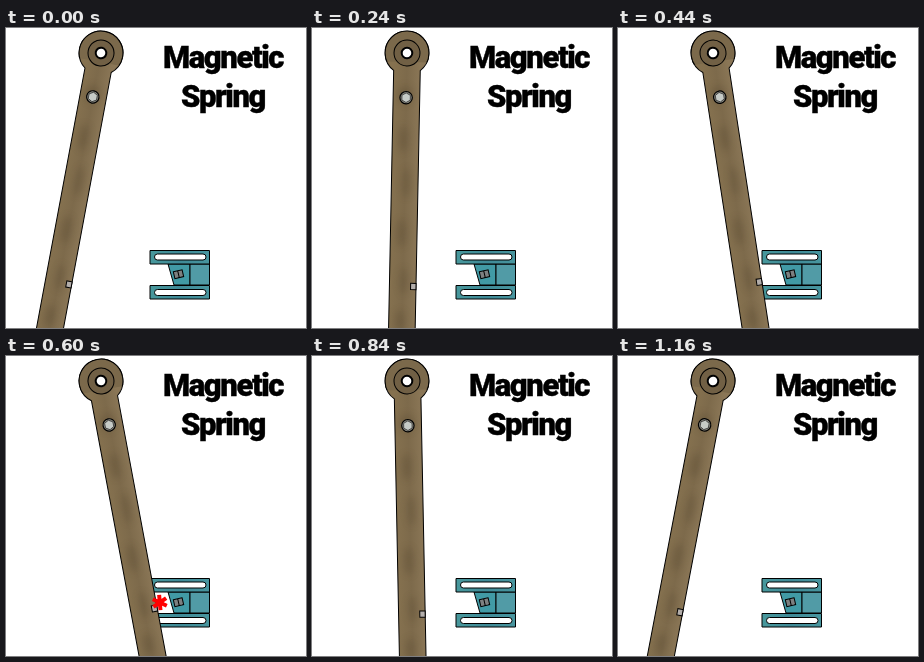
These frames come from a looping animation (300 px wide and 300 px high, 1200 ms). An HTML page:

```html
<!DOCTYPE html>
<html lang="en">
<head>
<meta charset="utf-8">
<title>Magnetic Spring</title>
<style>
  html, body { margin: 0; width: 100%; height: 100%; overflow: hidden; background: #fff; }
  svg { display: block; width: 100vw; height: 100vh; }
  .line { stroke: #000; stroke-width: 1; }
  .title { font: 900 31px Roboto, "Liberation Sans", sans-serif; letter-spacing: -1.4px;
           text-anchor: middle; stroke: #000; stroke-width: .4; }
</style>
</head>
<body>
<svg viewBox="0 0 300 300">
  <defs>
    <linearGradient id="wood" gradientUnits="userSpaceOnUse" x1="-13" y1="0" x2="13.600" y2="0">
      <stop offset="0" stop-color="#85714f"/>
      <stop offset=".5" stop-color="#7d6a4b"/>
      <stop offset="1" stop-color="#8a7656"/>
    </linearGradient>
    <linearGradient id="rail">
      <stop offset="0" stop-color="#48989c"/>
      <stop offset=".5" stop-color="#3f8a97"/>
      <stop offset="1" stop-color="#48969f"/>
    </linearGradient>
    <filter id="soft" x="-100%" y="-100%" width="300%" height="300%">
      <feGaussianBlur stdDeviation="3.500"/>
    </filter>
    <clipPath id="body"><path d="M-13 17H13.600V300H-13Z"/></clipPath>
  </defs>

  <g class="title">
    <text x="217" y="39.500">Magnetic</text>
    <text x="217" y="78.500">Spring</text>
  </g>

  <g class="line">
    <path d="M162 236H184V257H168Z" fill="#419aa5"/>
    <path d="M184 236H203.5V257H184Z" fill="#519ba6"/>
    <path d="M144 222.5H203.5V236H144ZM144 257.5H203.5V271H144Z" fill="url(#rail)"/>
    <g fill="#fff">
      <rect x="148.500" y="226" width="51.500" height="6" rx="3"/>
      <rect x="148.500" y="261.500" width="51.500" height="6" rx="3"/>
    </g>
    <g transform="translate(172.500 246.200) rotate(-13)" fill="#7d8080">
      <path d="M-4.500 -3.500H4.500V3.500H-4.500ZM0 -3.500V3.500"/>
    </g>
  </g>

  <g id="arm">
    <path class="line" fill="url(#wood)" d="M-13 17.700A22 22 0 1 1 13.600 17.300V300H-13Z"/>
    <g clip-path="url(#body)">
      <g filter="url(#soft)" fill="#5d4e34" opacity=".4">
        <ellipse cx="-1" cy="42" rx="8" ry="9"/>
        <ellipse cx="-2" cy="86" rx="5" ry="13"/>
        <ellipse cx="2" cy="130" rx="4" ry="15"/>
        <ellipse cx="-2" cy="180" rx="5" ry="14"/>
        <ellipse cx="1" cy="228" rx="4" ry="13"/>
        <ellipse cx="-2" cy="268" rx="5" ry="11"/>
      </g>
    </g>
    <circle class="line" r="21.900" fill="#7b694b" clip-path="inset(0 0 30% 0)"/>
    <circle class="line" r="13" fill="#716045"/>
    <circle r="5.300" fill="#fff" stroke="#000" stroke-width="2"/>
    <circle cy="44.700" r="6.200" fill="#8b8b83" stroke="#000" stroke-width="1.200"/>
    <path d="M0 39.900L4.200 42.300V47.100L0 49.500L-4.200 47.100V42.300Z" fill="#c6cbc7" stroke="#333" stroke-width=".8"/>
    <path class="line" d="M8.200 230.200H13.600V236.500H8.200Z" fill="#b3aeab"/>
  </g>

  <path id="burst" transform="translate(153.800 246.500) rotate(-5)" visibility="hidden"
    stroke="#f00" stroke-width="4" d="M0 -7.700V7.700M-6.700 -3.800L6.700 3.800M-6.700 3.800L6.700 -3.800"/>
</svg>
<script>
  const LOOP = 1200, STEP = 40, SWING = 10.8;
  const arm = document.getElementById("arm");
  const burst = document.getElementById("burst");

  function draw(now) {
    const t = Math.floor((now % LOOP) / STEP) * STEP;
    const angle = SWING * Math.cos(2 * Math.PI * (t + STEP) / LOOP);
    arm.setAttribute("transform", `translate(95 25) rotate(${angle})`);
    // the magnets repel near the right end of the swing
    burst.setAttribute("visibility", angle < -10.3 ? "visible" : "hidden");
  }

  let start;
  function tick(now) {
    start ??= now;
    draw(Math.max(0, now - start));
    requestAnimationFrame(tick);
  }
  draw(0);
  requestAnimationFrame(tick);
</script>
</body>
</html>
```
